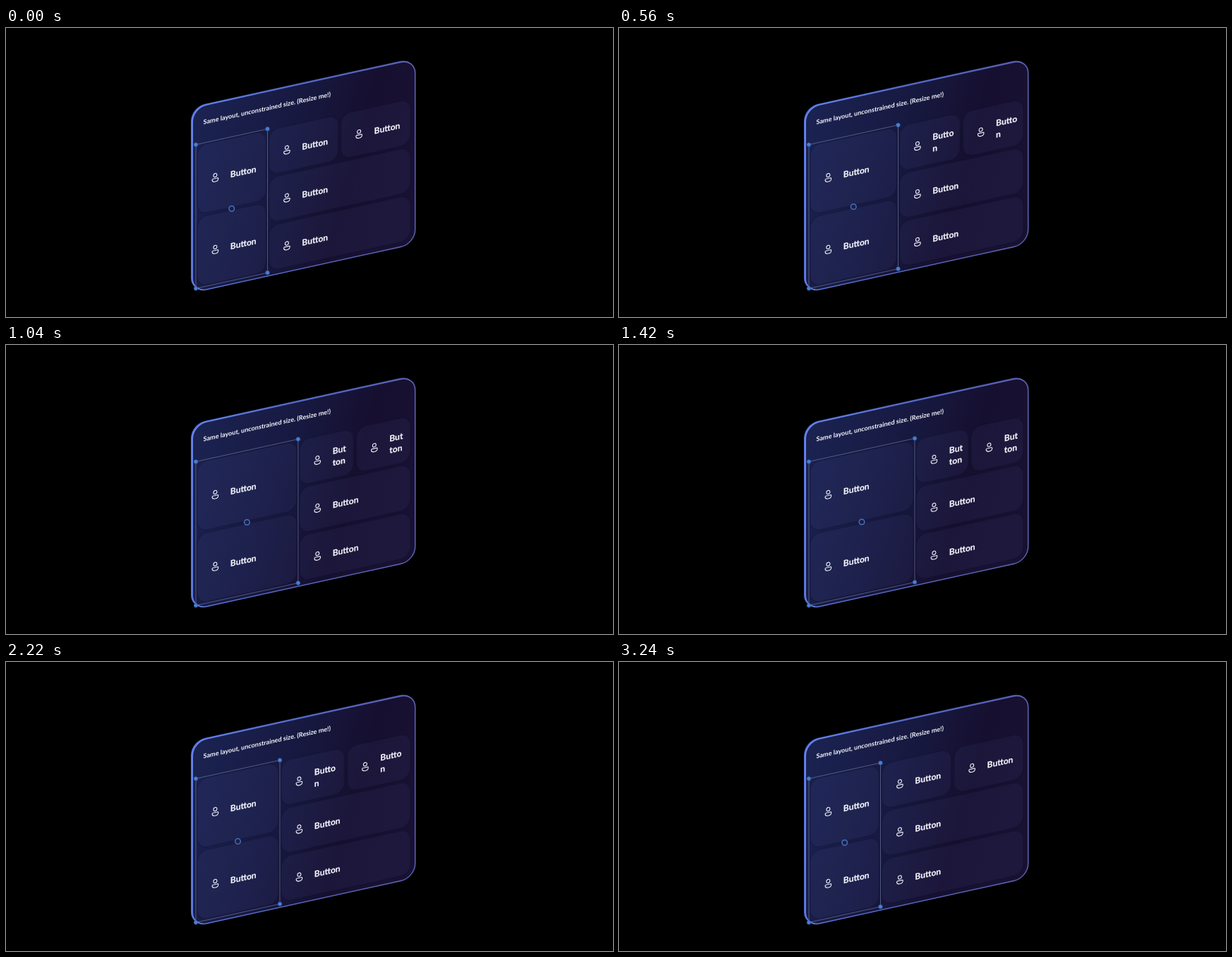
Recreate the animation shown at these times as an HTML page. Size 860x410 px, loop 3.31 s.

```html
<!DOCTYPE html>
<html lang="en">
<head>
<meta charset="utf-8">
<title>Resizable layout</title>
<style>
  html, body { margin: 0; width: 100%; height: 100%; overflow: hidden; background: #000; }
  svg { display: block; width: 860px; height: 410px; }
  text { font-family: Lato, "Open Sans", sans-serif; font-weight: 700; fill: #f4f5fc; }
  .label { font-size: 12.1px; stroke: #f4f5fc; stroke-width: .2; }
  .title { font-size: 9.08px; }
  .panel { fill: #8f96ff; fill-opacity: .05; stroke: #0a0c24; stroke-opacity: .18; stroke-width: 2; }
  .icon { fill: none; stroke: #eef0fa; stroke-width: 1.1; }
  .frame { fill: none; stroke: #a3a8cf; stroke-opacity: .52; stroke-width: .8; }
  .handle { fill: #4a80d6; stroke: #2c5499; stroke-width: .7; }
  .ring { fill: #191f47; stroke: #4870ba; stroke-width: 1.5; }
</style>
</head>
<body>
<svg viewBox="0 0 860 410">
  <defs>
    <linearGradient id="face" gradientUnits="userSpaceOnUse" x1="264" y1="130" x2="565" y2="225">
      <stop offset="0" stop-color="#1b2352"/>
      <stop offset=".5" stop-color="#17183f"/>
      <stop offset=".8" stop-color="#160f2f"/>
      <stop offset="1" stop-color="#181132"/>
    </linearGradient>
    <linearGradient id="edge" gradientUnits="userSpaceOnUse" x1="262" y1="130" x2="580" y2="200">
      <stop offset="0" stop-color="#6a8af2"/>
      <stop offset=".4" stop-color="#556ccc"/>
      <stop offset="1" stop-color="#5b5fae"/>
    </linearGradient>
    <linearGradient id="side" gradientUnits="userSpaceOnUse" x1="262" y1="130" x2="580" y2="200">
      <stop offset="0" stop-color="#5674de"/>
      <stop offset="1" stop-color="#4b519f"/>
    </linearGradient>
  </defs>
  <g transform="matrix(1 -.22 0 1 0 57.86)">
    <rect x="262" y="111.9" width="316" height="262.6" rx="20" fill="url(#side)"/>
    <rect x="264.2" y="113.6" width="315.5" height="262" rx="20" fill="url(#face)" stroke="url(#edge)" stroke-width="1.6"/>
    <text class="title" x="279.6" y="140.4">Same layout, unconstrained size. (Resize me!)</text>
    <g id="buttons"></g>
    <rect class="frame" id="frame" x="269" y="166.8" height="204"/>
  </g>
  <g id="handles"></g>
</svg>
<script>
const LOOP = 3310, SLOPE = .22;
const LEFT = 269, RIGHT = 575, TOP = 166.8, HEIGHT = 204, START = 370.5;

// time, divider offset, speed
const path = [
  [0, 0, .02], [560, 25, .045], [1040, 43.5, .025], [1420, 48.5, 0],
  [1850, 39.5, -.048], [2220, 17.5, -.058], [2830, 0, 0], [LOOP, 0, 0]
];
// first change, last change, number of changes
const runs = [[70, 560, 7], [660, 1110, 7], [1190, 1670, 7], [1760, 2220, 7], [2310, 2830, 8]];

const $ = id => document.getElementById(id);

function add(parent, name, attrs = {}) {
  const el = document.createElementNS("http://www.w3.org/2000/svg", name);
  set(el, attrs);
  return parent.appendChild(el);
}

function set(el, attrs) {
  for (const key in attrs) el.setAttribute(key, attrs[key]);
}

function makeButton() {
  const panel = add($("buttons"), "rect", { class: "panel", rx: 14 });
  const icon = add($("buttons"), "g", { class: "icon" });
  add(icon, "circle", { cy: -3.3, r: 2.5 });
  add(icon, "path", { d: "M-3.3 1.3H3.3Q4.3 1.3 4.3 2.3C4.3 4.6 2.4 5.9 0 5.9S-4.3 4.6-4.3 2.3Q-4.3 1.3-3.3 1.3Z" });
  const lines = [0, 1].map(() => add($("buttons"), "text", { class: "label" }));
  return { panel, icon, lines };
}

const buttons = Array.from({ length: 6 }, makeButton);
const handles = Array.from({ length: 4 }, () => add($("handles"), "circle", { class: "handle", r: 2.8 }));
const ring = add($("handles"), "circle", { class: "ring", r: 3.8 });

function fittingChars(width) {
  if (width >= 96.2) return 6;
  if (width >= 88.8) return 5;
  return width >= 81.5 ? 4 : 3;
}

function placeButton({ panel, icon, lines }, x, y, w, h) {
  const mid = y + h / 2, count = fittingChars(w), wrapped = count < 6;
  set(panel, { x: x + 2, y: y + 2, width: w - 4, height: h - 4 });
  set(icon, { transform: `translate(${x + 27.4} ${mid + 1.7})` });
  lines.forEach((line, i) => {
    set(line, { x: x + 48.8, y: mid + 6.6 + (wrapped ? i * 16.4 - 8.4 : 0) });
    line.textContent = i ? "Button".slice(count) : "Button".slice(0, count);
  });
}

function placeDot(dot, x, y) {
  set(dot, { cx: x, cy: y - SLOPE * (x - 263) });
}

// The drag is sampled in discrete steps.
function snap(t) {
  let held = 0;
  for (const [from, to, count] of runs) {
    if (t < from) break;
    const gap = (to - from) / (count - 1);
    held = from + gap * Math.min(count - 1, Math.floor((t - from + 10) / gap));
  }
  return held;
}

function offsetAt(t) {
  const i = path.findIndex(p => p[0] > t);
  const [t0, a, va] = path[i - 1], [t1, b, vb] = path[i];
  const d = t1 - t0, u = (t - t0) / d, v = 1 - u;
  return a * v * v * (1 + 2 * u) + b * u * u * (3 - 2 * u) + d * u * v * (va * v - vb * u);
}

function draw(now) {
  const x = START + offsetAt(snap(now % LOOP));
  const wide = RIGHT - x, half = wide / 2, row = HEIGHT / 3;
  const cells = [
    [LEFT, TOP, x - LEFT, HEIGHT / 2],
    [LEFT, TOP + HEIGHT / 2, x - LEFT, HEIGHT / 2],
    [x, TOP, half, row],
    [x + half, TOP, half, row],
    [x, TOP + row, wide, row],
    [x, TOP + 2 * row, wide, row]
  ];
  cells.forEach((cell, i) => placeButton(buttons[i], ...cell));
  set($("frame"), { width: x - LEFT });
  handles.forEach((dot, i) => placeDot(dot, i % 2 ? x : LEFT, TOP + (i > 1 ? HEIGHT : 0)));
  placeDot(ring, (LEFT + x) / 2, TOP + HEIGHT / 2);
}

const begin = performance.now();
function tick() {
  draw(performance.now() - begin);
  requestAnimationFrame(tick);
}
tick();
</script>
</body>
</html>
```
